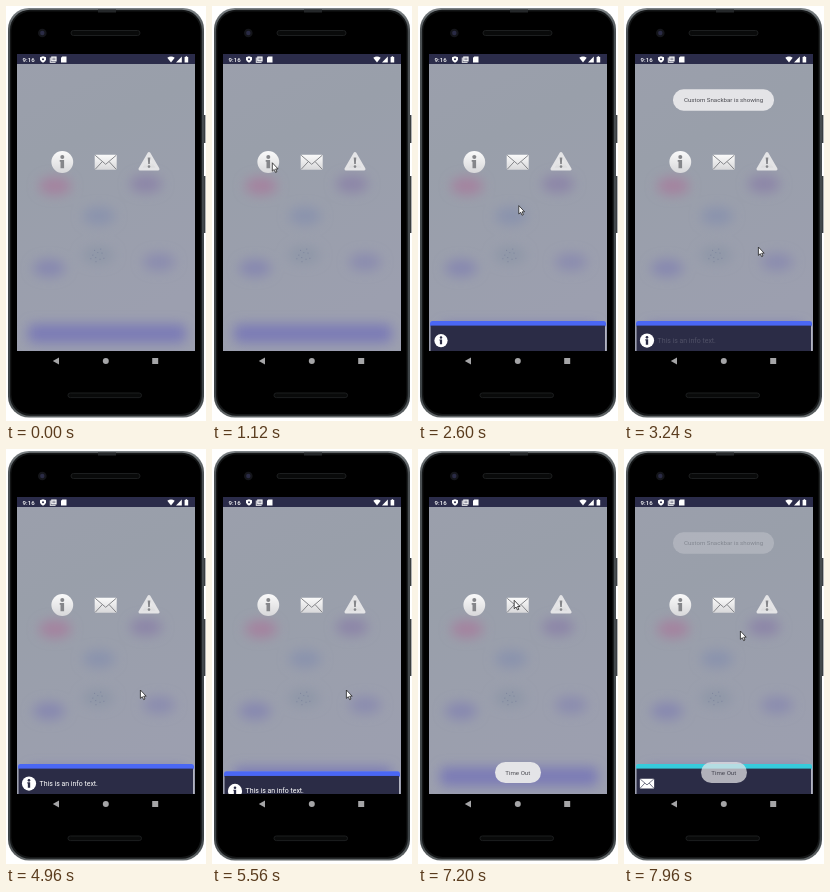
Recreate the animation shown at these times as an HTML page. Size 200 by 415 pixels, loop 8 s.

```html
<!DOCTYPE html>
<html lang="en">
<head>
<meta charset="utf-8">
<title>Snackbar demo</title>
<style>
html, body { margin: 0; width: 100%; height: 100%; overflow: hidden; background: #fff; }
svg { display: block; width: 100%; height: 100%; font-family: Roboto, sans-serif; }
.toast { font-size: 6.15px; text-anchor: middle; }
.toast rect { fill: #e4e4e7; }
.toast text { fill: #4a4a50; }
</style>
</head>
<body>
<svg viewBox="0 0 200 415">
  <defs>
    <linearGradient id="rim" x2="0" y2="1">
      <stop offset="0" stop-color="#7d8386"/><stop offset=".06" stop-color="#4a4f52"/>
      <stop offset=".94" stop-color="#3c4245"/><stop offset="1" stop-color="#626769"/>
    </linearGradient>
    <linearGradient id="wall" x2=".3" y2="1">
      <stop offset="0" stop-color="#9b9fac"/><stop offset=".35" stop-color="#999faa"/>
      <stop offset="1" stop-color="#9c9faf"/>
    </linearGradient>
    <linearGradient id="silver" x2="0" y2="1">
      <stop offset="0" stop-color="#fafafa"/><stop offset="1" stop-color="#d8d8da"/>
    </linearGradient>
    <filter id="blur" x="-60%" y="-100%" width="220%" height="300%"><feGaussianBlur stdDeviation="6"/></filter>
    <clipPath id="screen"><rect x="11" y="48" width="178" height="297"/></clipPath>
    <g id="info">
      <circle r="10.9"/>
      <path d="M-2.6-2H1.8V6.2H-1.8V-.2H-2.6Z" fill="currentColor"/>
      <circle cy="-5" r="2" fill="currentColor"/>
    </g>
    <g id="mail">
      <rect x="-11" y="-7.5" width="22" height="15" rx="1"/>
      <path d="M-10.5-7 0 2 10.5-7M-10.5 7-3.4-.7M10.5 7 3.4-.7" fill="none" stroke="currentColor"/>
    </g>
  </defs>

  <!-- phone -->
  <path d="M198 109h1.4v28H198zM198 170h1.4v57H198z" fill="#3a3e40"/>
  <rect x="2" y="2" width="196" height="409.5" rx="21" fill="url(#rim)"/>
  <rect x="4" y="3.8" width="191.8" height="406" rx="20" fill="#141617"/>
  <rect x="5.3" y="5.4" width="189.2" height="402.6" rx="19.5"/>
  <rect x="92" y="3.5" width="18" height="3" fill="#242729"/>
  <g fill="#090a0a" stroke="#1c1e1f">
    <rect x="65" y="24.5" width="69" height="5" rx="2.5"/>
    <rect x="62" y="387" width="73.5" height="4.6" rx="2.3"/>
  </g>
  <circle cx="36.3" cy="27" r="4.3" fill="#14151a"/>
  <circle cx="36.3" cy="27" r="2.2" fill="#2a2b45"/>

  <!-- wallpaper -->
  <g clip-path="url(#screen)">
    <rect x="11" y="48" width="178" height="297" fill="url(#wall)"/>
    <g id="spots" filter="url(#blur)">
      <rect x="22" y="318" width="158" height="19" rx="6" fill="#7b7bb6"/>
    </g>
    <path id="dots" stroke="#76809a" stroke-width=".8"/>
  </g>

  <!-- status bar -->
  <rect x="11" y="48" width="178" height="10" fill="#2b2c4a"/>
  <text x="16.6" y="55.5" font-size="6.1" font-weight="500" fill="#fff">9:16</text>
  <g fill="#fff">
    <path d="M37 50.2 40 51.3V53.5Q39.8 55.6 37 56.7 34.2 55.6 34 53.5V51.3Z"/>
    <path d="M45.2 50.4h5.4v5h-5.4zM43.8 51.5h.9v4.5h4.9v.8h-5.8z"/>
    <path d="M56.3 50.4H60.5V56.4H55V51.8Z"/>
    <path d="M161.3 51.8Q165 49 168.7 51.8L165 56.4Z"/>
    <path d="M175.8 50.4V56.4H170Z"/>
    <path d="M178.6 50.9h1v-.7h1.6v.7h1v5.7h-3.6z"/>
  </g>
  <circle cx="37" cy="53.3" r="1" fill="#2b2c4a"/>
  <path d="M46.3 52.2h3.2M46.3 53.7h3.2" stroke="#2b2c4a" stroke-width=".6"/>

  <!-- navigation bar -->
  <g fill="#a5a5a7">
    <path d="M46.8 355 53 351.5V358.5Z"/>
    <circle cx="99.8" cy="355" r="3"/>
    <rect x="146.2" y="352" width="6" height="6"/>
  </g>

  <!-- buttons -->
  <g fill="url(#silver)" color="#85868a">
    <use href="#info" x="56.3" y="156"/>
    <use href="#mail" x="99.7" y="156.3"/>
    <path d="M143 147.5 152 163H134Z" stroke="#e4e4e6" stroke-width="3" stroke-linejoin="round"/>
    <path d="M141.7 151.5h2.6l-.5 6.6h-1.6z" fill="currentColor"/>
    <circle cx="143" cy="160.6" r="1.3" fill="currentColor"/>
  </g>

  <g clip-path="url(#screen)">
    <g id="bar">
      <rect x="12" y="315" width="176" height="34" rx="2" fill="#b2b4c0"/>
      <rect id="accent" x="12" y="315" width="176" height="6" rx="2.2"/>
      <rect x="12.5" y="319.6" width="174.5" height="30" fill="#2b2c46"/>
      <g id="icon" fill="#fff" color="#2b2c46"><use id="glyph" href="#info"/></g>
      <text id="label" x="33.6" y="336.8" font-size="6.95" fill="#fff">This is an info text.</text>
    </g>
  </g>

  <g id="shown" class="toast">
    <rect x="49" y="83.3" width="101" height="21.4" rx="10.5"/>
    <text x="99.5" y="96.4">Custom Snackbar is showing</text>
  </g>
  <g id="timeout" class="toast">
    <rect x="77" y="313" width="46" height="21" rx="10.5"/>
    <text x="99.8" y="325.8">Time Out</text>
  </g>

  <path id="cursor" d="M0 0V8.4L1.9 6.7 3.2 9.6 4.6 9 3.3 6.2H5.8Z" fill="#fff" stroke="#222" stroke-width=".8"/>
</svg>
<script>
const $ = id => document.getElementById(id);
const set = (id, name, value) => $(id).setAttribute(name, value);
const LOOP = 8000, STEP = 40, OPEN = 2200, REOPEN = 7360;

const ramp = (t, from, to) => Math.min(1, Math.max(0, (t - from) / (to - from)));
const easeOut = (t, from, to) => 1 - (1 - ramp(t, from, to)) ** 3;

// Blurred app icons: centre and colour
const spots = [
  [49, 180, '#a4829f'], [140, 178, '#8c85a8'], [93, 210, '#8a93ad'],
  [43, 262, '#8788b0'], [153, 256, '#8b8caf'], [92, 249, '#8f97a8']
];
for (const [x, y, fill] of spots)
  $('spots').insertAdjacentHTML('beforeend', `<ellipse cx="${x}" cy="${y}" rx="16" ry="9" fill="${fill}"/>`);

// Speckles spread along a golden-angle spiral
let speckles = '';
for (let i = 1; i < 11; i++) {
  const r = 2.4 * Math.sqrt(i), a = 2.4 * i;
  speckles += `M${91 + r * Math.cos(a)} ${250 + r * Math.sin(a)}h1`;
}
set('dots', 'd', speckles);

// Pointer moves: start and end time, place reached
const moves = [
  [400, 1240, 60, 156], [1280, 1440, 60, 152], [1600, 1840, 57, 147], [2000, 2200, 63, 153],
  [2440, 3160, 134.4, 241], [5760, 6040, 131.2, 212.5], [6040, 6800, 96.2, 151.3], [7440, 7960, 116.4, 182]
];
function pointer(t) {
  let x = 164, y = 418;
  for (const [from, to, toX, toY] of moves) {
    const u = easeOut(t, from, to);
    x += (toX - x) * u;
    y += (toY - y) * u;
  }
  return `translate(${x} ${y})`;
}

function draw(now) {
  const t = Math.floor(now % LOOP / STEP) * STEP;
  const second = t >= REOPEN;
  const open = t - (second ? REOPEN : OPEN); // time since the bar was opened
  const closing = second ? 0 : ramp(t, 5440, 5720) ** 2;

  const drop = open < 0 ? 40 : 20 * (1 - easeOut(open, 0, 240)) + 40 * closing;
  set('bar', 'transform', `translate(0 ${drop})`);
  set('accent', 'fill', second ? '#36cbdc' : '#4a67f4');
  set('glyph', 'href', second ? '#mail' : '#info');
  set('icon', 'transform', `translate(23 334.6) scale(${.65 * easeOut(open, 160, 560)})`);
  set('label', 'opacity', ramp(open, 960, 1440));

  const hiding = second ? 0 : ramp(t, 4500, 4960);
  set('shown', 'opacity', ramp(open, 520, 800) * (1 - hiding));
  set('timeout', 'opacity', ramp(t, 5760, 6160) * (1 - ramp(t, 7840, 8280)));
  set('cursor', 'transform', pointer(t));
}

function tick(now) {
  draw(now);
  requestAnimationFrame(tick);
}
draw(0);
requestAnimationFrame(tick);
</script>
</body>
</html>
```
